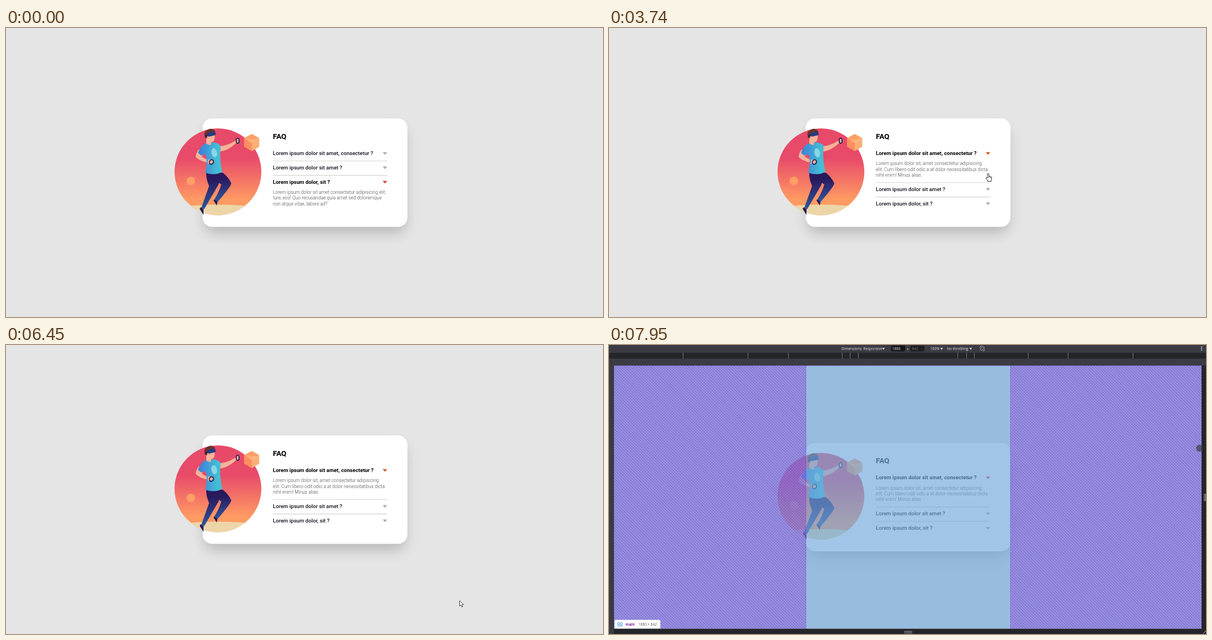
These frames come from a looping animation (1076x521 px, 8000 ms). An HTML page:

```html
<!DOCTYPE html>
<html lang="pt">
<head>
<meta charset="utf-8">
<title>FAQ</title>
<style>
  html, body { margin: 0; height: 100%; overflow: hidden; background: #e5e5e5; }
  svg { display: block; width: 100vw; height: 100vh; }
  text { white-space: pre; }
  #card text { font-family: Roboto, sans-serif; }
  .question { font-size: 9.58px; font-weight: 500; fill: #11111a; }
  .active .question { font-weight: 700; fill: #000; }
  .answer { font-size: 8.45px; font-weight: 300; fill: #444; visibility: hidden; }
  .active .answer { visibility: visible; }
  #menu, #tools, #tag { font: 6.5px "Open Sans", sans-serif; }
  #shell { filter: drop-shadow(0 3px 3px rgba(0,0,0,.4)); }
</style>
</head>
<body>
<svg viewBox="0 0 1076 521" preserveAspectRatio="none">
  <defs>
    <linearGradient id="sky" x2="0" y2="1">
      <stop offset=".34" stop-color="#e84a69"/><stop offset=".82" stop-color="#ff9a63"/>
    </linearGradient>
    <linearGradient id="shirt">
      <stop offset=".1" stop-color="#3d84d8"/><stop offset=".8" stop-color="#45bdd5"/>
    </linearGradient>
    <linearGradient id="pants" x2="0" y2="1">
      <stop offset=".2" stop-color="#29195d"/><stop offset="1" stop-color="#31569c"/>
    </linearGradient>
    <clipPath id="disc"><circle cx="382" cy="259.200" r="78.200"/></clipPath>
    <filter id="soft" x="-20%" y="-30%" width="140%" height="160%"><feGaussianBlur stdDeviation="12"/></filter>
    <pattern id="hatch" width="3.500" height="3.700" patternUnits="userSpaceOnUse" patternTransform="rotate(45)">
      <rect width="2.300" height=".9" fill="#6d3cb8" opacity=".75"/>
    </pattern>
  </defs>

  <rect width="1076" height="521" fill="#e5e5e5"/>

  <g id="card">
    <rect x="358.500" y="181" width="361" height="188" rx="14" opacity=".2" filter="url(#soft)"/>
    <rect x="354.500" y="163" width="369" height="195.500" rx="17" fill="#fff"/>

    <circle cx="382" cy="259.200" r="78.200" fill="url(#sky)"/>
    <path d="M300 324Q382 313 464 324V340H300Z" fill="#ecd6a8" clip-path="url(#disc)"/>
    <circle cx="333.200" cy="275.700" r="7.800" fill="#ff9e66"/>
    <g>
      <path d="M443 191l13.500 7.500L443 207l-14-8.500z" fill="#ffa066"/>
      <path d="M429 198.500l14 8.500v15l-14-8z" fill="#ff8f60"/>
      <path d="M456.500 198.500L443 207v15l13.500-8z" fill="#fbae78"/>
      <path d="M429 198.500l14 3 13.500-3-13.500 8.500z" fill="#ffc08a" opacity=".6"/>
    </g>

    <g>
      <path d="M384 213q13 0 28-9l6-3 2 4-7 4q-13 12-28 14z" fill="#f8b398"/>
      <ellipse cx="417.500" cy="203.300" rx="2.600" ry="4.600" fill="#f8b398" stroke="#24204f" stroke-width="1.800"/>
      <path d="M376 260l15 1q11 9 15 19 0 5-25 34l-6-4q9-14 13-28l-13-9z" fill="url(#pants)"/>
      <path d="M361 259q13 5 27 2 1 8-6 23l-25 43-5-3q8-22 14-39-6-14-5-26z" fill="url(#pants)"/>
      <path d="M375 309l6 4-1 7-6-9zM351 323l5 4v10l-7-11z" fill="#241a55"/>
      <path d="M347 219q-6 9-5 14 9 8 27 11l3-5q-13-2-19-7l5-9z" fill="#f8b398"/>
      <path d="M361 207l14-1q9 2 12 7l-1 12q0 19 4 34-13 8-31 2 4-15 2-30l-4-4-4 3q-5-2-7-6 6-13 15-17z" fill="url(#shirt)"/>
      <ellipse cx="375.300" cy="225" rx="5" ry="8.300" transform="rotate(-12 375 225)" fill="#88d6e4"/>
      <path d="M364 237l8 1 1 5-9 2z" fill="#f8b398"/>
      <ellipse cx="370.500" cy="241.500" rx="3.600" ry="4.300" fill="none" stroke="#24204f" stroke-width="1.800" transform="rotate(25 370 241)"/>
      <path d="M361 190l15 2q1 8-2 12-2 2-5 2l1 4q-5 2-9-2z" fill="#f8b398"/>
      <path d="M359 198q-4-11 3-14 7-5 14 0l1 5-13 3-2 7z" fill="#6b332c"/>
      <path d="M358.500 194l6-3-.5 3-5 3z" fill="#1d2350"/>
      <path d="M364 189l11-2.500q4 1 2.500 6.500l-12 3q-4-3-1.500-7z" fill="#273c80"/>
    </g>

    <text x="481" y="199.800" font-size="13.5" font-weight="700">FAQ</text>
    <g id="items"></g>
  </g>

  <g id="menu" fill="#f1f1f2">
    <rect id="shell" x="772" y="194" width="256" height="279" rx="4.500" fill="#1b1b1d"/>
    <rect id="hover" x="772" width="256" height="15.800" fill="#343538"/>
    <path d="M772 250.500h256M772 323.300h256M772 365.500h256M772 407h256M772 432.500h256" stroke="#454649" stroke-width=".9"/>
    <path d="M785.500 338v-4.500h6M784.500 339.200h4M789.500 335.500h2.500v4h-2.500z" fill="none" stroke="#ddd" stroke-width=".8"/>
    <rect x="785" y="349" width="7.500" height="7.500" fill="#b9babd"/>
    <circle cx="788.500" cy="419.700" r="4.600" fill="#d32a1e"/>
    <rect x="879.500" y="390" width="19.500" height="9" rx="1.500" fill="#3b4456"/>
    <text x="889.200" y="396.500" font-size="5.2" font-weight="700" text-anchor="middle">NOVO</text>
    <path d="M1011 417.300l2.400 2.400-2.400 2.400" fill="none" stroke="#ddd" stroke-width=".8"/>
  </g>

  <g id="overlay">
    <rect x="9" y="37" width="1059" height="474.500" fill="#6fa8dc" opacity=".66"/>
    <g id="gaps"></g>
    <path d="M355 37V511.500M723.500 37V511.500M9 37.300H1068" stroke="#8038cc" stroke-width=".7" stroke-dasharray="2 1.500"/>
    <g id="tag">
      <rect x="10" y="495.500" width="82.500" height="16" rx="2" fill="#fff"/>
      <path d="M15.500 500.500h3.500v2.500h-3.500zM20.500 500.500h3.500v2.500h-3.500zM15.500 504.500h5v2.500h-5zM22 504.500h2v2.500h-2z" fill="none" stroke="#4b9be8" stroke-width=".8"/>
      <text x="29.800" y="506" font-weight="700" fill="#7d1fa0">main</text>
      <text x="53" y="506" fill="#555">1880 × 842</text>
    </g>
  </g>

  <g id="tools" fill="#e6e6ea">
    <path d="M0 0H1076V37H9V521H0Z" fill="#3b3c43"/>
    <path d="M0 14H1076V24.500H0ZM1068 37h8V521H9v-9.500H1068Z" fill="#242529"/>
    <path id="ticks" stroke="#77787d"/>
    <path d="M532 516.300h14.500M532 519h14.500M1073 268v13.500M1075.300 268v13.500M1071 520l5-5" stroke="#b0b1b5"/>
    <rect x="508.500" y="1" width="25.500" height="10.500" rx="2" fill="#16161a"/>
    <rect x="543" y="1" width="25.500" height="10.500" rx="2" fill="#1e1e23"/>
    <text x="419" y="9">Dimensions: Responsive</text>
    <text x="510.500" y="9">1880</text>
    <text x="536.500" y="9.500">×</text>
    <text x="546" y="9" fill="#77787d">842</text>
    <text x="579" y="9">100%</text>
    <text x="609" y="9">No throttling</text>
    <path d="M492.500 5h4.600l-2.300 3.800zM597.300 5h4.600l-2.300 3.800zM649.700 5h4.600l-2.300 3.800z"/>
    <g fill="none" stroke="#c8c8cc" stroke-width=".9">
      <rect x="670.700" y="2.500" width="4" height="7.500" rx="1" transform="rotate(45 672.700 6.300)"/>
      <path d="M668.500 5q0-3 3-3.500M677 7.500q0 3-3 3.500"/>
    </g>
    <path d="M1067.200 2.800h1.600v1.600h-1.600zM1067.200 5.600h1.600v1.600h-1.600zM1067.200 8.400h1.600v1.600h-1.600z"/>
  </g>

  <g id="pointer">
    <circle id="press" r="7"/>
    <path id="arrow" d="M0 0V9.800L2.300 7.700 4 11.300 5.700 10.500 4.100 7H7Z" fill="#fff" stroke="#111" stroke-width=".8"/>
    <path id="hand" d="M-1.400.8Q0-.8 1.200.8V5Q3.500 4.300 4 6 6 5.500 6.300 8L5.500 11.500V14.300H-1V12.500L-4.300 8.300Q-3.500 6.500-1.400 8.300Z M1.200 5V8M4 6V8.500" fill="#fff" stroke="#111" stroke-width=".9" stroke-linejoin="round"/>
    <circle id="touch" r="6" fill="#282828" fill-opacity=".55" stroke="#555" stroke-opacity=".45" stroke-width="1.200"/>
  </g>
</svg>

<script>
const LOOP = 8000;
const $ = id => document.getElementById(id);
const show = (id, on) => $(id).style.display = on ? '' : 'none';

function add(parent, tag, attrs, text = '') {
  const node = document.createElementNS('http://www.w3.org/2000/svg', tag);
  for (const key in attrs) node.setAttribute(key, attrs[key]);
  node.textContent = text;
  return parent.appendChild(node);
}

const faq = [
  ['Lorem ipsum dolor sit amet, consectetur ?',
    'Lorem ipsum dolor sit, amet consectetur adipisicing',
    'elit. Cum libero odit odio a at dolor necessitatibus dicta',
    'nihil enim! Minus alias'],
  ['Lorem ipsum dolor sit amet ?',
    'Lorem ipsum dolor sit amet consectetur adipisicing',
    'elit. Quis totam dolore, harum eos facilis nemo',
    'quidem sint fugiat?'],
  ['Lorem ipsum dolor, sit ?',
    'Lorem ipsum dolor sit amet consectetur adipisicing elit.',
    'Iure, eos! Quo recusandae quia amet sed doloremque',
    'non atque vitae, labore ad?']
];
const items = faq.map(([question, ...answer], i) => {
  const group = add($('items'), 'g', {});
  if (i) add(group, 'path', { d: 'M481 -12H687', stroke: '#d4d4d4', 'stroke-width': 1.1 });
  add(group, 'text', { class: 'question', x: 481, y: 3.2 }, question);
  answer.forEach((line, row) =>
    add(group, 'text', { class: 'answer', x: 481, y: 21.7 + row * 10.14 }, line));
  const caret = add(group, 'path', {
    d: 'M680-1.500H686L683 1.800Z', 'stroke-width': 1.2, 'stroke-linejoin': 'round'
  });
  return { group, caret };
});

const menuRows = [
  [207, 'Voltar', 'Alt+Seta para a esquerda', true],
  [222.7, 'Avançar', 'Alt+Seta para a direita', true],
  [238.4, 'Recarregar', 'Ctrl+R'],
  [264, 'Salvar como...', 'Ctrl+S'],
  [279.7, 'Imprimir...', 'Ctrl+P'],
  [295.4, 'Transmitir...'],
  [311, 'Pesquisar imagens com Vexoli'],
  [336.7, 'Enviar para seus dispositivos'],
  [352.7, 'Criar QR code para esta página'],
  [379, 'Traduzir para o português'],
  [394.5, 'Abrir no modo de leitura'],
  [419.8, 'NixVela — o melhor bloqueador de anúncios'],
  [445.4, 'Exibir código fonte da página', 'Ctrl+U'],
  [461.1, 'Inspecionar']
];
for (const [y, label, shortcut, dim] of menuRows) {
  const fill = dim ? '#77787c' : '#f1f1f2';
  add($('menu'), 'text', { x: 800, y: y + 2.3, fill }, label);
  if (shortcut) add($('menu'), 'text', { x: 1016, y: y + 2.3, fill, 'text-anchor': 'end' }, shortcut);
}

for (const [x, width] of [[9, 346], [723.5, 344.5]])
  for (const [fill, opacity] of [['#8a2be2', .3], ['url(#hatch)', 1]])
    add($('gaps'), 'rect', { x, y: 37, width, height: 474.5, fill, opacity });

$('ticks').setAttribute('d', [133, 250, 323, 420, 434, 449, 628, 644, 658, 755, 827, 944]
  .map(x => `M${x + .5} 14V24.500`).join(''));

// Pointer hotspot: time, x, y
const path = [
  [190, 972, 427], [540, 810, 335], [780, 690, 256], [880, 669, 234], [950, 683, 228],
  [1080, 683, 228], [1150, 683, 226.5], [1690, 683, 226.5], [1960, 684, 290], [2130, 684, 290],
  [2430, 685, 307], [2570, 685, 317], [2720, 685, 317], [3130, 684, 230], [3270, 683, 226],
  [3410, 683, 226], [3740, 683.5, 262], [3930, 684, 291], [4080, 684, 291], [4210, 684, 284],
  [4560, 683, 229], [5080, 683, 228], [5480, 772, 194], [5680, 772, 194], [5820, 784, 245.6],
  [6060, 800, 375], [6310, 817.5, 461], [7140, 817.5, 461], [7210, 809, 443], [7400, 809, 443],
  [7620, 900, 350], [7800, 1010, 230], [7900, 1064.5, 186], [LOOP, 1064.5, 186]
];
// Left-button releases: time, item opened
const clicks = [[1550, 0], [2090, 1], [2640, 2], [3410, 0], [4080, 1], [4700, 0]];

function pointerAt(t) {
  const k = Math.max(1, path.findIndex(point => point[0] > t));
  const [t0, x0, y0] = path[k - 1], [t1, x1, y1] = path[k];
  const p = Math.max(0, (t - t0) / (t1 - t0));
  return [x0 + (x1 - x0) * p, y0 + (y1 - y0) * p];
}

function render(t) {
  const [x, y] = pointerAt(t);
  const devtools = t >= 6860;
  const open = clicks.reduce((current, [time, item]) => t >= time ? item : current, 2);

  $('card').setAttribute('transform', `translate(0 ${devtools ? 13.4 : 0})`);
  let top = 226;
  items.forEach(({ group, caret }, i) => {
    const active = i === open;
    group.setAttribute('class', active ? 'active' : '');
    group.setAttribute('transform', `translate(0 ${top - .2})`);
    const color = !active ? '#adadad' : t < 1480 || devtools ? '#e5443f' : '#cf5c27';
    caret.setAttribute('fill', color);
    caret.setAttribute('stroke', color);
    top += active ? 64.9 : 25.9;
  });

  show('menu', t >= 5680 && t < 6450);
  const hovered = menuRows.find(([rowY, , , dim]) => !dim && Math.abs(y - rowY) < 7.9);
  show('hover', hovered);
  if (hovered) $('hover').setAttribute('y', hovered[0] - 7.9);

  show('tools', devtools);
  show('overlay', t >= 7140);

  const hand = x < 688 && t < 5200;
  show('pointer', t >= 190);
  $('pointer').setAttribute('transform', `translate(${x} ${y})`);
  show('hand', hand);
  show('arrow', !hand && !devtools);
  show('touch', devtools);
  const rightPress = t >= 5550 && t < 5680;
  show('press', rightPress || clicks.some(([time]) => t >= time - 70 && t < time));
  $('press').setAttribute('fill', rightPress ? '#f07070' : 'rgba(255,255,0,.45)');
}

function tick(now) {
  render(now % LOOP);
  requestAnimationFrame(tick);
}
render(0);
requestAnimationFrame(tick);
</script>
</body>
</html>
```
